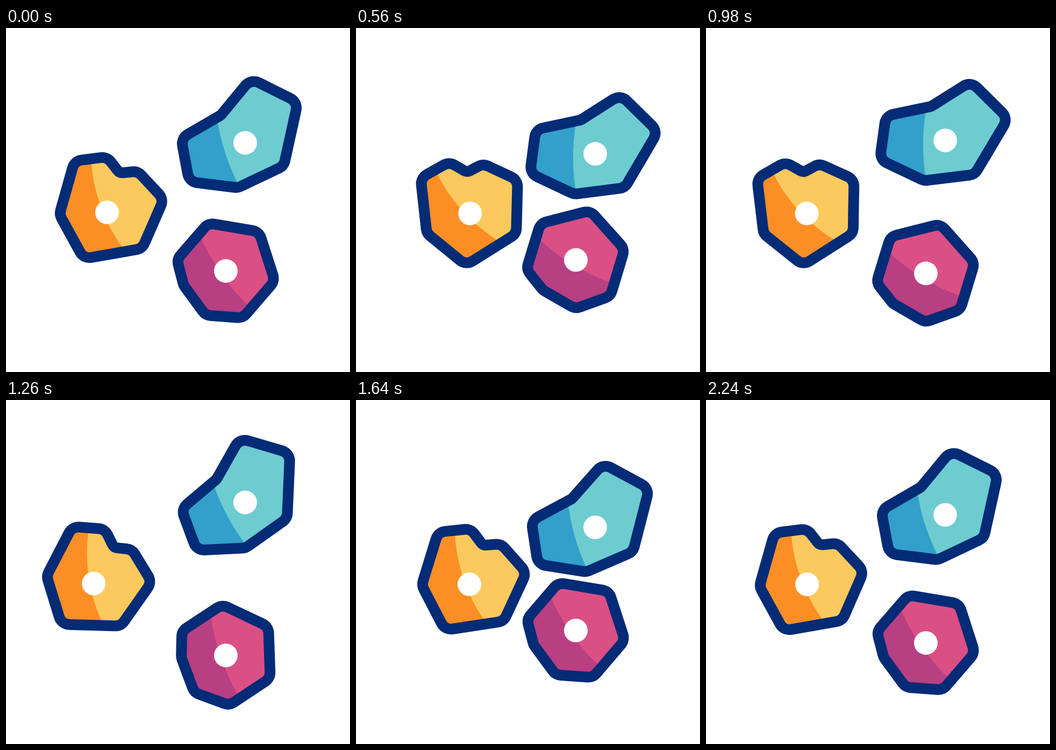
Animation of 640x640 px, one loop 2.4 s. Source, as an HTML page with a canvas:

```html
<!DOCTYPE html>
<html lang="en">
<head>
<meta charset="utf-8">
<title>Wobbling stones</title>
<style>
  html, body { margin: 0; width: 100%; height: 100%; overflow: hidden; background: #fff; }
  canvas { display: block; }
</style>
</head>
<body>
<canvas width="640" height="640"></canvas>
<script>
const ctx = document.querySelector('canvas').getContext('2d');
const LOOP = 2400, STEP = 20, NAVY = '#042b76';
const SHIFT_TIMES = [200, 700, 1200, 1700, 2200];
const SHIFTS = [0, 25.2, -25.2, 25.2, 0];
const TURN_TIMES = [200, 800, 1400, 1820, 2240];

// points: corners of the outline's centre line; notch: index of the concave corner
// split: start, control and end of the curve between the two tones
const stones = [
  {
    light: '#fbc95e', dark: '#fb8f25', dir: [1, 0], pivot: [195, 334], dot: [188, 343],
    turns: [0, -34, 19, -10, 0], notch: 2,
    points: [[127.5, 247.3], [187.8, 239.7], [211.4, 269.9], [245, 266.5],
             [293.4, 318.4], [253.5, 410.2], [144.7, 429.4], [99.4, 346.9]],
    split: [158, 243, 164, 337, 219, 412], side: 60
  },
  {
    light: '#6dccd0', dark: '#32a0ca', dir: [0, 1], pivot: [445, 214], dot: [445, 213.7],
    turns: [0, 27.8, -16, 13.6, 0], notch: 0,
    points: [[400, 162], [455.7, 94.5], [543, 137.8], [516.8, 256.6],
             [431, 297.2], [340.8, 285.9], [325.8, 205.1]],
    split: [392.5, 167, 402.5, 235, 434.7, 296], side: 290
  },
  {
    light: '#da5085', dark: '#b83f82', dir: [0, -1], pivot: [409, 452], dot: [409, 452],
    turns: [0, -37, 24.2, -16, 0], notch: -1,
    points: [[376.5, 363], [470.7, 378.9], [500, 470.3], [440.5, 539.5],
             [371.3, 534.4], [330.4, 478.5], [318, 430.6]],
    split: [358, 380, 392.5, 462, 456, 522], side: 280
  }
];

// Eased value between keyframes
function ease(t, times, values) {
  if (t <= times[0]) return values[0];
  const i = times.findIndex(k => t < k);
  if (i < 0) return values[values.length - 1];
  const u = (t - times[i - 1]) / (times[i] - times[i - 1]);
  return values[i - 1] + (values[i] - values[i - 1]) * u * u * (3 - 2 * u);
}

function outline({ points, notch }) {
  const path = new Path2D(), n = points.length;
  const [a, b] = [points[n - 1], points[n - 2]];
  path.moveTo((a[0] + b[0]) / 2, (a[1] + b[1]) / 2);
  for (let k = 0; k < n; k++) {
    const i = (n - 1 + k) % n;
    path.arcTo(...points[i], ...points[(i + 1) % n], i === notch ? 11 : 20);
  }
  path.closePath();
  return path;
}

function drawStone(s, t) {
  const shift = ease(t, SHIFT_TIMES, SHIFTS);
  const [px, py] = s.pivot;
  ctx.save();
  ctx.translate(px + s.dir[0] * shift, py + s.dir[1] * shift);
  ctx.rotate(ease(t, TURN_TIMES, s.turns) * Math.PI / 180);
  ctx.translate(-px, -py);

  ctx.fillStyle = s.light;
  ctx.fill(s.path);

  ctx.save();
  ctx.clip(s.path);
  const [x0, y0, cx, cy, x1, y1] = s.split;
  ctx.beginPath();
  ctx.moveTo(x0, y0);
  ctx.quadraticCurveTo(cx, cy, x1, y1);
  ctx.lineTo(x1, y1 + 40);
  ctx.lineTo(s.side, y1 + 40);
  ctx.lineTo(s.side, y0 - 40);
  ctx.lineTo(x0, y0 - 40);
  ctx.fillStyle = s.dark;
  ctx.fill();
  ctx.restore();

  ctx.strokeStyle = NAVY;
  ctx.lineWidth = 20;
  ctx.lineJoin = 'round';
  ctx.stroke(s.path);

  ctx.beginPath();
  ctx.arc(...s.dot, 22, 0, Math.PI * 2);
  ctx.fillStyle = '#fff';
  ctx.fill();
  ctx.restore();
}

const start = performance.now();

function frame() {
  const t = Math.floor((performance.now() - start) % LOOP / STEP) * STEP;
  ctx.fillStyle = '#fff';
  ctx.fillRect(0, 0, 640, 640);
  stones.forEach(s => drawStone(s, t));
  requestAnimationFrame(frame);
}

stones.forEach(s => s.path = outline(s));
frame();
</script>
</body>
</html>
```
